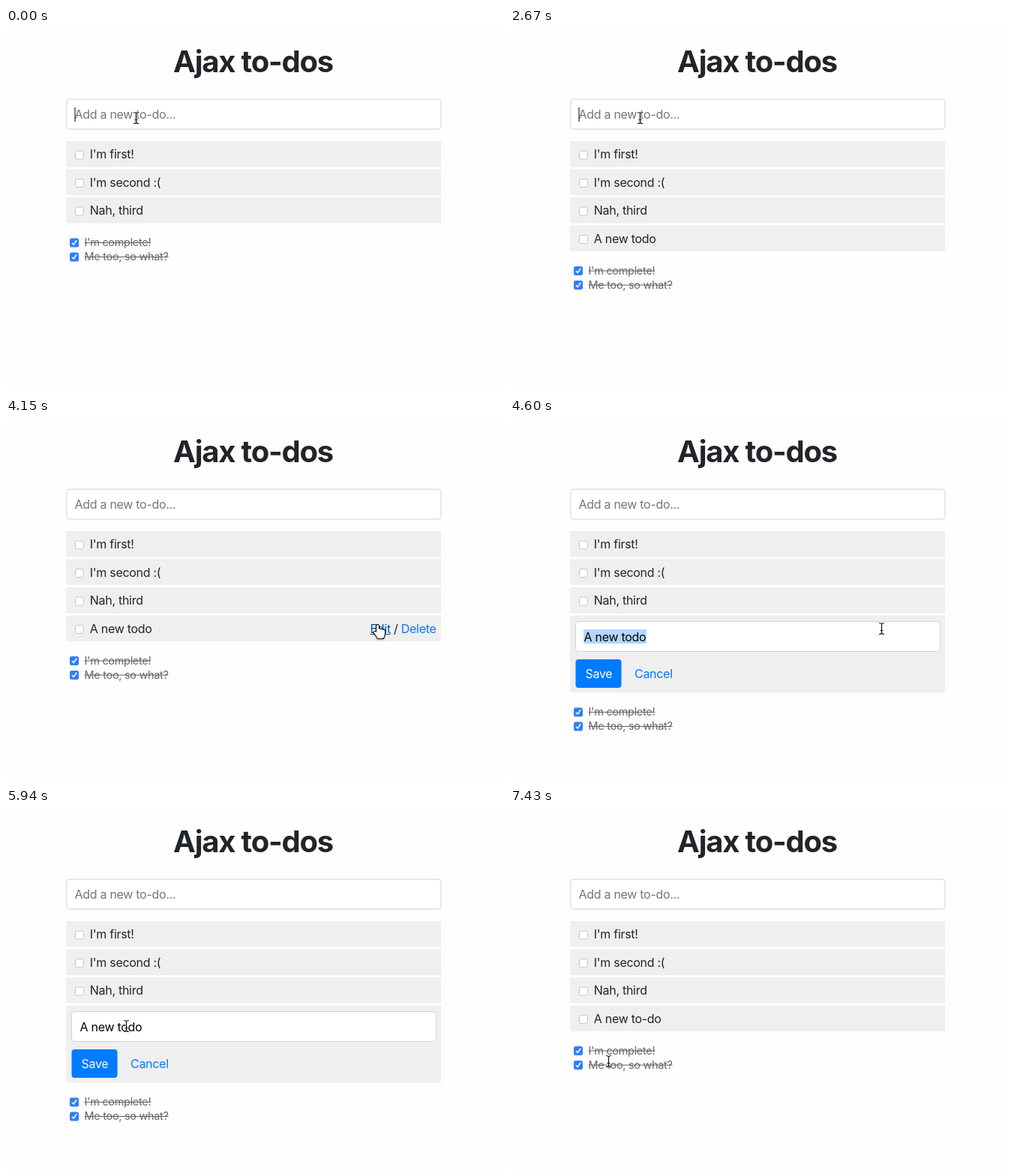
Write an HTML page with a canvas that moves like this. It is 664x483 px and loops after 8 s.

```html
<!DOCTYPE html>
<html lang="en">
<head>
<meta charset="utf-8">
<title>Ajax to-dos</title>
<style>
  html, body { margin: 0; width: 100%; height: 100%; overflow: hidden; background: #fefefe; }
  canvas { display: block; width: 664px; height: 483px; }
</style>
</head>
<body>
<canvas id="stage" width="664" height="483"></canvas>
<script>
const ctx = document.getElementById('stage').getContext('2d');
const LOOP = 8000;
const INK = '#212529', BLUE = '#007bff', GREY = '#757575';
const ROW_TOP = 151, ROW_PITCH = 37.5, ROW_HEIGHT = 34.5;
const FORM_HEIGHT = 103;

// Each track lists [start time, ...values]; values hold until the next entry.
const typing = [
  [0, ''], [890, 'A '], [1190, 'A n'], [1330, 'A new'], [1480, 'A new '],
  [1780, 'A new t'], [1930, 'A new to'], [2070, 'A new tod'], [2220, 'A new todo'], [2670, '']
];
const topCaret = [
  [0, true], [140, false], [590, true], [2370, false], [2670, true],
  [2970, false], [3420, true], [4000, false]
];
const editCaret = [[0, false], [5640, true], [5940, false], [6230, true]];
const pointer = [
  [0, 173, 120, 'beam'],
  [3270, 190, 131, 'beam'], [3420, 304, 199, 'arrow'], [3560, 419, 258, 'arrow'],
  [3710, 470, 275, 'arrow'], [3860, 489, 280, 'hand'], [4000, 494, 281, 'hand'],
  [4150, 495, 281, 'hand'], [4600, 495, 281, 'beam'],
  [4900, 484, 279, 'beam'], [5050, 424, 275, 'beam'], [5190, 324, 274, 'beam'],
  [5340, 228, 280, 'beam'], [5490, 174, 288, 'beam'], [5640, 160, 291, 'beam'],
  [6980, 158, 295, 'arrow'], [7130, 147, 312, 'arrow'],
  [7280, 136, 329, 'beam'], [7430, 131, 338, 'beam']
];

const at = (track, t) => track.findLast(entry => entry[0] <= t).slice(1);

function setFont(size, weight = 440, tracking = -0.018) {
  ctx.font = `${weight} ${size}px Inter, "Noto Sans", sans-serif`;
  ctx.letterSpacing = `${size * tracking}px`;
}

function text(str, x, y, color = INK) {
  ctx.fillStyle = color;
  ctx.fillText(str, x, y);
}

function box(x, y, w, h, radius, fill, stroke) {
  ctx.beginPath();
  ctx.roundRect(x, y, w, h, radius);
  ctx.fillStyle = fill;
  ctx.fill();
  if (stroke) {
    ctx.strokeStyle = stroke;
    ctx.lineWidth = 1;
    ctx.stroke();
  }
}

function line(points, color, width) {
  ctx.beginPath();
  points.forEach(([x, y]) => ctx.lineTo(x, y));
  ctx.strokeStyle = color;
  ctx.lineWidth = width;
  ctx.stroke();
}

function caret(x, y) {
  ctx.fillStyle = '#000';
  ctx.fillRect(x, y, 1, 19);
}

function drawTopInput(t) {
  const [value] = at(typing, t);
  box(80.8, 95, 499.2, 40, 4, '#fff', '#ced4da');
  setFont(16);
  text(value || 'Add a new to-do...', 91.5, 121, value ? '#000' : GREY);
  if (at(topCaret, t)[0]) caret(91.5 + ctx.measureText(value).width, 106);
}

function drawLinks(baseline, overEdit) {
  const parts = [['Edit', overEdit ? '#0056b3' : BLUE], [' / ', INK], ['Delete', BLUE]];
  const widths = parts.map(([str]) => ctx.measureText(str).width);
  let x = 573.5 - widths.reduce((a, b) => a + b);
  parts.forEach(([str, color], i) => {
    text(str, x, baseline, color);
    if (i === 0 && overEdit) line([[x, baseline + 2], [x + widths[0], baseline + 2]], color, 1);
    x += widths[i];
  });
}

function drawRow(label, y, mouse) {
  const [mx, my, shape] = mouse;
  box(80, y, 500, ROW_HEIGHT, [3, 0, 0, 3], '#efefef');
  box(92.5, y + 13, 11, 11, 2.5, '#fff', '#c6c6c6');
  setFont(16);
  text(label, 111.8, y + 23);
  if (mx > 80 && mx < 580 && my >= y && my < y + ROW_HEIGHT) drawLinks(y + 23, shape === 'hand');
}

function drawForm(y, t) {
  const value = t < 6380 ? 'A new todo' : 'A new to-do';
  const typed = t < 6380 ? 'A new to' : 'A new to-';
  box(80, y, 500, FORM_HEIGHT, [3, 0, 0, 3], '#efefef');
  box(87.5, 271.5, 486, 40, 4, '#fff', '#ced4da');
  setFont(16);
  if (t < 5640) {
    ctx.fillStyle = '#b3d7ff';
    ctx.fillRect(98, 282, ctx.measureText(value).width + 1, 19);
  }
  text(value, 98.5, 297.5, '#000');
  if (at(editCaret, t)[0]) caret(98 + ctx.measureText(typed).width, 282);
  box(87.5, 322, 61, 38, 4, BLUE);
  text('Save', 100.5, 347, '#fff');
  text('Cancel', 166, 347, BLUE);
}

function drawDone(label, y) {
  box(85, y - 5.5, 12, 12, 2.5, '#2f80f8');
  line([[88, y + 0.7], [90.2, y + 3], [94.2, y - 2.8]], '#fff', 1.5);
  setFont(14.4);
  text(label, 104.6, y + 5, '#666');
  const end = 104.6 + ctx.measureText(label).width;
  line([[104.6, y + 0.5], [end, y + 0.5]], '#606060', 1);
}

function drawBeam() {
  const beam = new Path2D('M-3.5-7.5Q-.5-7.5 0-6Q.5-7.5 3.5-7.5M0-6V6M-3.5 7.5Q-.5 7.5 0 6Q.5 7.5 3.5 7.5M-2 2.5H2');
  ctx.strokeStyle = 'rgba(255,255,255,.75)';
  ctx.lineWidth = 2.4;
  ctx.stroke(beam);
  ctx.strokeStyle = '#111';
  ctx.lineWidth = 1.2;
  ctx.stroke(beam);
}

function drawOutlined(path, fill, stroke) {
  ctx.save();
  ctx.shadowColor = 'rgba(0,0,0,.35)';
  ctx.shadowBlur = 3;
  ctx.shadowOffsetY = 1;
  ctx.lineWidth = 2;
  ctx.strokeStyle = stroke;
  ctx.stroke(path);
  ctx.restore();
  ctx.fillStyle = fill;
  ctx.fill(path);
}

const cursors = {
  beam: drawBeam,
  arrow: () => drawOutlined(
    new Path2D('M-.5 0V13.2L2.6 10.4L4.8 15.2L6.8 14.3L4.8 9.7H9Z'), '#000', '#fff'),
  hand: () => drawOutlined(
    new Path2D('M-1.5-4Q0-6 1.5-4V1Q3-.5 4.2 1.5Q6-.2 7 2Q9 .5 9.5 3V7Q9 10 7.5 13H0Q-1.5 9-5 5.5Q-5 3-1.5 5Z'), '#fff', '#000')
};

function drawPointer([x, y, shape]) {
  ctx.save();
  ctx.translate(x + 0.5, y);
  ctx.lineJoin = 'round';
  cursors[shape]();
  ctx.restore();
}

function draw(t) {
  const mouse = at(pointer, t);
  const editing = t >= 4450 && t < 6830;
  const labels = ["I'm first!", "I'm second :(", 'Nah, third'];
  if (t >= 2670 && !editing) labels.push(t < 6830 ? 'A new todo' : 'A new to-do');

  ctx.fillStyle = '#fefefe';
  ctx.fillRect(0, 0, 664, 483);
  setFont(40, 700, -0.03);
  text('Ajax to-dos', 223, 59);
  drawTopInput(t);

  labels.forEach((label, i) => drawRow(label, ROW_TOP + i * ROW_PITCH, mouse));
  let bottom = ROW_TOP + (labels.length - 1) * ROW_PITCH + ROW_HEIGHT;
  if (editing) {
    const top = ROW_TOP + 3 * ROW_PITCH;
    drawForm(top, t);
    bottom = top + FORM_HEIGHT;
  }
  drawDone("I'm complete!", bottom + 25.5);
  drawDone('Me too, so what?', bottom + 44.5);
  drawPointer(mouse);
}

const start = performance.now();
function tick() {
  draw((performance.now() - start) % LOOP);
  requestAnimationFrame(tick);
}
tick();
</script>
</body>
</html>
```
